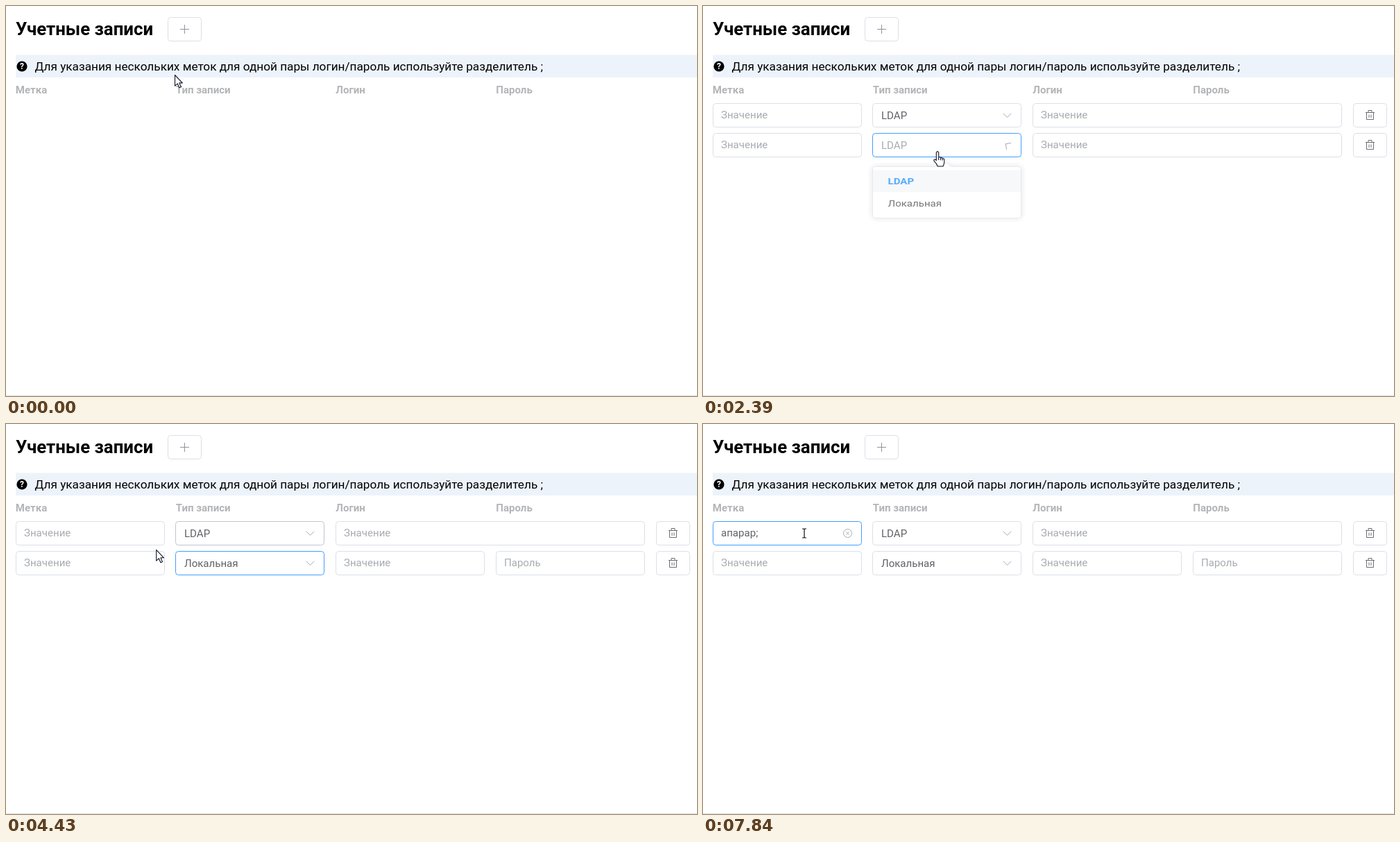
An HTML page for the animation above (8000 ms loop, 996 by 562 pixels).

```html
<!DOCTYPE html>
<html lang="ru">
<head>
<meta charset="utf-8">
<title>Учетные записи</title>
<style>
  html, body { margin: 0; width: 100%; height: 100%; overflow: hidden; background: #fff; }
  svg { display: block; width: 996px; height: 562px; font: 15.05px Roboto, Arial, sans-serif; }
  .box { fill: #fff; stroke: #dcdfe6; }
  .box.hover { stroke: #c0c4cc; }
  .box.focus { stroke: #409eff; }
  .hint { fill: #a8abb2; }
  .value { fill: #606266; }
  .head { fill: #b3b5b8; font-weight: 700; }
  .icon { fill: none; stroke: #6b6d72; }
  .soft { stroke: #a8abb2; }
  #menu { filter: drop-shadow(0 0 5px rgba(0, 0, 0, .13)); }
  #add path { stroke: #909399; }
  #add.hover rect { fill: #ecf5ff; stroke: #a9d3f5; }
  #add.hover path { stroke: #409eff; }
  .item.hover rect { fill: #f5f7fa; }
  .pointer { fill: #fff; stroke: #111526; stroke-width: 1.1; stroke-linejoin: round; }
</style>
</head>
<body>
<svg viewBox="0 0 996 562">
  <text x="14" y="42" font-size="25.8" font-weight="700">Учетные записи</text>
  <g id="add">
    <rect class="box" x="233.5" y="16.5" width="48" height="34" rx="4"/>
    <path class="icon" d="M251 33.5h13M257.5 27v13"/>
  </g>
  <rect x="14" y="70.5" width="982" height="32.5" fill="#edf3fb"/>
  <circle cx="23" cy="87" r="7.6"/>
  <text x="23" y="91.2" font-size="12" font-weight="700" fill="#fff" text-anchor="middle">?</text>
  <text x="41.5" y="93" font-size="17.2">Для указания нескольких меток для одной пары логин/пароль используйте разделитель ;</text>
  <g class="head">
    <text x="13.8" y="126">Метка</text>
    <text x="244.8" y="126">Тип записи</text>
    <text x="475.3" y="126">Логин</text>
    <text x="706.3" y="126">Пароль</text>
  </g>
  <g id="rows"></g>
  <path id="caret" stroke="#333" d="M0 150v15"/>
  <path d="M0 561.5h996" stroke="#dfe1e5"/>
  <g id="menu">
    <path d="M345.5 .5l6-6 6 6" fill="#fff" stroke="#e4e7ed"/>
    <path d="M248.5 .5h97.6M356.9 .5h97.6a4 4 0 0 1 4 4v77a4 4 0 0 1-4 4h-206a4 4 0 0 1-4-4v-77a4 4 0 0 1 4-4" fill="#fff" stroke="#e4e7ed"/>
    <g class="item"><rect x="245" y="6.5" width="213" height="36.5" fill="#fff"/>
      <text x="266.5" y="30">LDAP</text></g>
    <g class="item"><rect x="245" y="43" width="213" height="36.5" fill="#fff"/>
      <text x="266.5" y="66.5">Локальная</text></g>
  </g>
  <circle id="press" r="14" fill="#f8f35a" opacity=".82"/>
  <g id="cursor">
    <path class="pointer" d="M.5 .5V16.2L4.2 12.8 6.8 18.8 9.3 17.7 6.8 11.9H11.3Z"/>
    <path class="pointer" d="M-1.7 1Q0-1.8 1.7 1V8Q4.1 6.8 4.6 9 6.8 7.9 7.3 10 9.6 9.2 9.8 11.6V15Q9.4 18 8 21H.3Q-1 17.2-5 13.4-5.7 10.6-3 11.2L-1.7 12.6ZM1.7 8v4M4.6 9v3.2M7.3 10v2.6"/>
    <path fill="none" stroke="#111" stroke-width="1.2" d="M-3-6.5h2.2L0-5.7.8-6.5H3M0-5.7V5.7M-3 6.5h2.2L0 5.7.8 6.5H3"/>
  </g>
</svg>
<script>
const LOOP = 8000, PITCH = 43, FADE = 300, MENU_LAG = 22;
const T = { row1: 800, row2: 1200, open: 2268, pick: 3335, focus: 4850 };
const PRESSES = [[680, 830], [1090, 1200], [2140, 2268], [3210, 3335], [4780, 4930]];
const PATH = [
  [70, 243, 99], [200, 247, 86], [420, 256, 40], [540, 258, 30],
  [1330, 258, 30], [1500, 270, 62], [1750, 318, 172], [1950, 338, 210],
  [2440, 338, 210], [2600, 336, 255], [2800, 333, 291],
  [3960, 333, 291], [4160, 308, 232], [4330, 262, 168], [4430, 216.5, 181],
  [4570, 172, 166], [4710, 146, 157.5]
];
const TYPED = [[5890, 'а'], [6020, 'ап'], [6360, 'апа'], [6620, 'апара'], [7230, 'апарар'], [7370, 'апарар;']];
const CARET = [[T.focus, 5340], [5890, 7840]];

const $ = id => document.getElementById(id);
const clamp = v => Math.max(0, Math.min(1, v));
const during = (spans, t) => spans.some(([a, b]) => t >= a && t < b);
const show = (el, on) => { el.style.display = on ? '' : 'none'; };
const ease = p => 1 - (1 - p) ** 2.2;
const quint = p => 1 - (1 - p) ** 5;
const inside = ([x, y], left, top, w, h) => x >= left && x <= left + w && y >= top && y <= top + h;

// Rises from 0 to 1 when the list opens and falls back after the choice.
const openness = (t, curve) => curve(clamp((t - T.open) / FADE)) - curve(clamp((t - T.pick) / FADE));

function field(x, w, text, type = 'hint', pad = 11.5) {
  return `<g><rect class="box" x="${x}" y="140.5" width="${w}" height="34" rx="4"/>
    <text class="${type}" x="${x + pad}" y="${type === 'value' ? 162.8 : 162.2}">${text}</text></g>`;
}

function makeRow(i) {
  const g = document.createElementNS('http://www.w3.org/2000/svg', 'g');
  g.setAttribute('transform', `translate(0 ${i * PITCH})`);
  g.innerHTML = field(14.5, 214, 'Значение') + field(244.5, 214, 'LDAP', 'value', 12.5) +
    field(475.5, 445, 'Значение') + field(706.5, 214, 'Пароль') + field(937.5, 48, '') +
    `<path class="icon soft" d="M-5.7-2.8L0 2.9 5.7-2.8"/>
     <path class="icon" d="M955 153.5h13M959 153v-2.5h5v2.5M956.5 154v9.5h10V154M960 156.5v4.5M963 156.5v4.5"/>
     <path class="icon soft" d="M202.5 157.5a6 6 0 1 1 12 0a6 6 0 1 1-12 0M206.4 155.4l4.2 4.2M210.6 155.4l-4.2 4.2"/>`;
  $('rows').append(g);
  const [label, type, login, pass, , chevron, , clear] = g.children;
  chevron.setAttribute('transform', 'translate(438.5 157.5)');
  show(pass, false);
  show(clear, false);
  return { g, label, type, login, pass, chevron, clear };
}

const rows = [makeRow(0), makeRow(1)];
const items = [...document.querySelectorAll('.item')];
const pointers = [...$('cursor').children];

function pointAt(t) {
  const next = PATH.findIndex(k => k[0] > t);
  if (next === 0) return PATH[0].slice(1);
  if (next < 0) return PATH[PATH.length - 1].slice(1);
  const [a, b] = [PATH[next - 1], PATH[next]];
  const p = (t - a[0]) / (b[0] - a[0]);
  return [a[1] + (b[1] - a[1]) * p, a[2] + (b[2] - a[2]) * p];
}

function setState(el, hover, focus) {
  el.firstElementChild.setAttribute('class', 'box' + (focus ? ' focus' : hover ? ' hover' : ''));
}

function setText(el, text, type) {
  const node = el.lastElementChild;
  node.textContent = text;
  node.setAttribute('class', type);
}

// Returns the pointer for the spot: 0 arrow, 1 hand, 2 text beam.
function drawRows(t, now, before) {
  const opened = t >= T.open && t < T.pick, local = t >= T.pick;
  const shown = [t >= T.row1, t >= T.row2];
  let kind = 0;
  rows.forEach((row, i) => {
    const y = 140.5 + i * PITCH;
    const over = (p, x, w) => shown[i] && inside(p, x, y, w, 34);
    const hovered = (x, w) => over(now, x, w) || over(before, x, w);
    show(row.g, shown[i]);
    setState(row.label, hovered(14.5, 214), i === 0 && t >= T.focus);
    setState(row.type, hovered(244.5, 214), i === 1 && t >= T.open && t < T.focus);
    if (over(now, 244.5, 214)) kind = 1;
    if (over(now, 14.5, 214) || over(now, 475.5, 445)) kind = 2;
  });

  const [first, second] = rows;
  setText(second.type, local ? 'Локальная' : 'LDAP', opened ? 'hint' : 'value');
  second.login.firstElementChild.setAttribute('width', local ? 214 : 445);
  show(second.pass, local);
  second.chevron.setAttribute('transform', `translate(438.5 157.5) rotate(${180 * openness(t, ease)})`);

  const typed = TYPED.filter(k => k[0] <= t).pop();
  setText(first.label, typed ? typed[1] : 'Значение', typed ? 'value' : 'hint');
  show(first.clear, !!typed);
  const width = typed ? first.label.lastElementChild.getComputedTextLength() : 0;
  $('caret').setAttribute('transform', `translate(${Math.round(26 + width) + .5} 0)`);
  show($('caret'), during(CARET, t));
  return kind;
}

function drawMenu(t, now) {
  const amount = openness(t - MENU_LAG, quint);
  const menu = $('menu');
  show(menu, amount > .002);
  menu.setAttribute('transform', `translate(0 231) scale(1 ${amount})`);
  menu.style.opacity = amount;
  const active = now[1] > 274 ? 1 : 0, chosen = t < T.pick ? 0 : 1;
  items.forEach((item, i) => {
    item.classList.toggle('hover', i === active);
    const text = item.lastElementChild;
    text.setAttribute('fill', i === chosen ? '#409eff' : '#606266');
    text.setAttribute('font-weight', i === chosen ? 700 : 400);
  });
  return t >= T.open && t < T.pick && inside(now, 244, 237, 215, 74);
}

function draw(t) {
  const now = pointAt(t), before = pointAt(t - 100);
  const onAdd = inside(now, 233, 16, 49, 35);
  $('add').classList.toggle('hover', onAdd);
  let kind = drawRows(t, now, before);
  if (drawMenu(t, now) || onAdd) kind = 1;
  pointers.forEach((p, i) => show(p, i === kind));
  const place = `translate(${now[0]} ${now[1]})`;
  $('cursor').setAttribute('transform', place);
  $('press').setAttribute('transform', place);
  show($('press'), during(PRESSES, t));
}

const start = performance.now();
function tick() {
  draw((performance.now() - start) % LOOP);
  requestAnimationFrame(tick);
}
tick();
</script>
</body>
</html>
```
